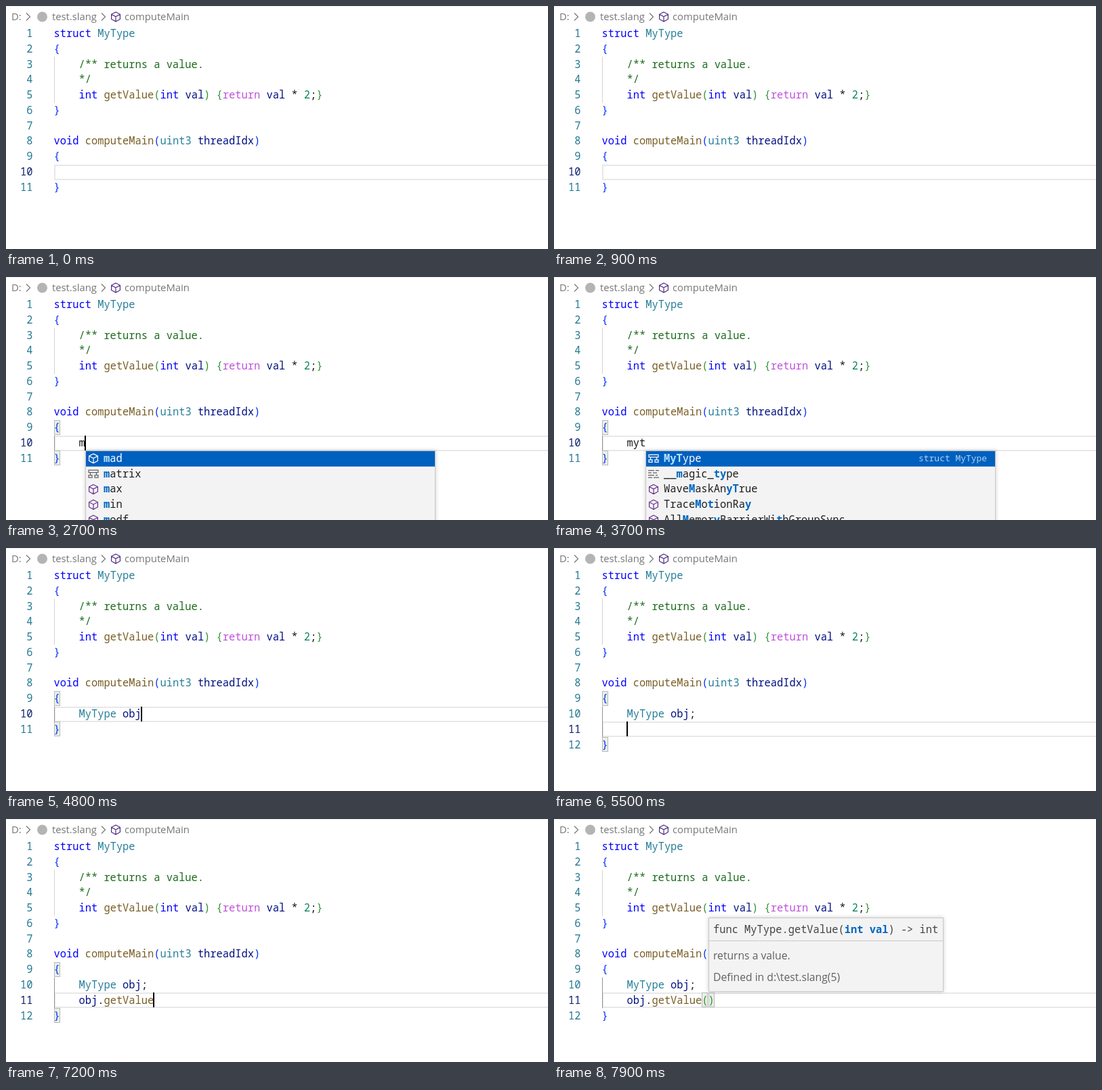
These frames come from a looping animation (800 px wide and 360 px high, 8 s). An HTML page with a canvas:

```html
<!DOCTYPE html>
<html lang="en">
<head>
<meta charset="utf-8">
<title>Code completion</title>
<style>
html, body { margin: 0; width: 100%; height: 100%; overflow: hidden; background: #fff; }
canvas { display: block; }
</style>
</head>
<body>
<canvas id="stage" width="800" height="360"></canvas>
<script>
const ctx = document.getElementById('stage').getContext('2d');
const LOOP = 8000, CHAR = 9.23, ROW = 22.78, LEFT = 70.6, POPUP_WIDTH = 517;
const MONO = '"Noto Sans Mono", monospace', SANS = '"Open Sans", sans-serif';
const CODE = `15.38px ${MONO}`, BOLD = `bold ${CODE}`;

const color = {
  keyword: '#0000ff', type: '#267f99', func: '#795e26', variable: '#001080', comment: '#1c6b1c',
  control: '#c050dc', number: '#098658', outer: '#0431fa', inner: '#319331', plain: '#1a1a1a'
};

// Code lines are lists of [colour name, text].
const header = [
  [['keyword', 'struct '], ['type', 'MyType']],
  [['outer', '{']],
  [['comment', '    /** returns a value.']],
  [['comment', '    */']],
  [['keyword', '    int '], ['func', 'getValue'], ['inner', '('], ['keyword', 'int '], ['variable', 'val'],
   ['inner', ') {'], ['control', 'return '], ['variable', 'val'], ['plain', ' * '], ['number', '2'],
   ['plain', ';'], ['inner', '}']],
  [['outer', '}']],
  [],
  [['keyword', 'void '], ['func', 'computeMain'], ['outer', '('], ['type', 'uint3 '],
   ['variable', 'threadIdx'], ['outer', ')']],
  [['outer', '{']]
];
const plain = text => [['plain', text]];
const declare = (name, end = '') => [['type', 'MyType'], ['variable', ' ' + name], ['plain', end]];
const declared = declare('obj', ';');
const object = [['variable', 'obj'], ['plain', '.']];
const method = [...object, ['func', 'getValue']];

// Popup rows: icon letter, then the label with matched letters between tildes.
const lists = {
  m: ['f~m~ad', 's~m~atrix', 'f~m~ax', 'f~m~in', 'f~m~odf'],
  my: ['s~My~Type', 'k__~m~agic_t~y~pe', 'fWave~M~askAn~y~True', 'fTrace~M~otionRa~y~', 'fAll~M~emor~y~BarrierWithGroupSync'],
  myt: ['s~MyT~ype', 'k__~m~agic_~ty~pe', 'fWave~M~askAn~yT~rue', 'fTrace~M~o~t~ionRa~y~', 'fAll~M~emor~y~BarrierWi~t~hGroupSync'],
  o: ['v~o~bj', 'k~o~ut', 'f~O~bjectRayDirection', 'f~O~bjectRayOrigin'],
  ob: ['v~ob~j', 'f~Ob~jectRayDirection', 'f~Ob~jectRayOrigin', 'f~Ob~jectToWorld'],
  obj: ['v~obj~', 'f~Obj~ectRayDirection', 'f~Obj~ectRayOrigin', 'f~Obj~ectToWorld'],
  member: ['fgetValue']
};
const details = {
  my: 'struct MyType', myt: 'struct MyType', o: 'MyType obj', ob: 'MyType obj', obj: 'MyType obj',
  member: 'func MyType.getValue(int val) -> int'
};

// Each step: start time, typed lines, open popup.
const steps = [
  [0, [[]]],
  [1200, [[]]],
  [2700, [plain('m')], 'm'],
  [3000, [plain('my')], 'my'],
  [3100, [plain('myt')], 'myt'],
  [4000, [[['type', 'MyType']]]],
  [4300, [declare('')]],
  [4500, [declare('o')]],
  [4600, [declare('ob')]],
  [4800, [declare('obj')]],
  [5100, [declared]],
  [5400, [declared, []]],
  [5900, [declared, plain('o')], 'o'],
  [6300, [declared, plain('ob')], 'ob'],
  [6500, [declared, [['variable', 'obj']]], 'obj'],
  [6700, [declared, object], 'member'],
  [7200, [declared, method]],
  [7400, [declared, [...method, ['inner', '(']]]]
];
const FOCUS = 1200, CALL = 7400, TOOLTIP = 7500;

const icons = {
  f: 'M8 1 14.4 4.3V11.5L8 15 1.6 11.5V4.3ZM1.6 4.3 8 7.7 14.4 4.3M8 7.7V15',
  s: 'M1 2.5H15V6H1ZM1 10H6V13.5H1ZM10 10H15V13.5H10ZM3.5 6V10M12.5 6V10',
  k: 'M0 3H9M11 3H16M0 6.5H5M7 6.5H13M0 10H9M11 10H14M0 13.5H6M8 13.5H16',
  v: 'M3.5 3H1V13H3.5M12.5 3H15V13H12.5M4.5 8A3.5 3 0 1 0 11.5 8A3.5 3 0 1 0 4.5 8M5 11 11 5'
};
const iconColor = { f: '#652d90', s: '#616161', k: '#616161', v: '#007acc' };

const lineCenter = line => 41 + ROW * (line - 1);
const lineTop = line => lineCenter(line) - ROW / 2;
const columnX = n => LEFT + CHAR * n;
const tokensLength = tokens => tokens.reduce((sum, [, text]) => sum + text.length, 0);

function fillBox(x, y, w, h, fill) {
  ctx.fillStyle = fill;
  ctx.fillRect(x, y, w, h);
}

function borderedBox(x, y, w, h, fill, stroke) {
  fillBox(x, y, w, h, fill);
  ctx.strokeStyle = stroke;
  ctx.lineWidth = 1;
  ctx.strokeRect(x + .5, y + .5, w - 1, h - 1);
}

function panel(x, y, w, h) {
  ctx.save();
  ctx.shadowColor = 'rgba(0,0,0,.2)';
  ctx.shadowBlur = 6;
  fillBox(x, y, w, h, '#f3f3f3');
  ctx.restore();
  borderedBox(x, y, w, h, '#f3f3f3', '#c8c8c8');
}

function write(text, x, y, fill, font = CODE, align = 'left') {
  ctx.font = font;
  ctx.fillStyle = fill;
  ctx.textAlign = align;
  ctx.fillText(text, x, y + 5);
}

function writeTokens(tokens, x, y) {
  for (const [name, text] of tokens) {
    write(text, x, y, color[name]);
    x += text.length * CHAR;
  }
}

function icon(kind, x, y, stroke) {
  ctx.save();
  ctx.translate(x, y - 8);
  ctx.strokeStyle = stroke;
  ctx.lineWidth = 1.2;
  ctx.stroke(new Path2D(icons[kind]));
  ctx.restore();
}

function chevron(x) {
  ctx.strokeStyle = '#767676';
  ctx.lineWidth = 1.2;
  ctx.stroke(new Path2D(`M${x} 10.5l5.5 5.5l-5.5 5.5`));
}

function breadcrumb() {
  const font = `14.8px ${SANS}`;
  fillBox(0, 0, 800, 1, '#eceef3');
  write('D:', 8, 16, '#767676', font);
  chevron(30);
  ctx.fillStyle = '#b4b4b4';
  ctx.beginPath();
  ctx.arc(53.5, 16, 7.5, 0, 7);
  ctx.fill();
  write('test.slang', 68, 16, '#767676', font);
  chevron(141);
  icon('f', 154, 16, '#4b2a80');
  write('computeMain', 175, 16, '#767676', font);
}

function bracketBox(line, col) {
  borderedBox(Math.round(columnX(col)), Math.round(lineTop(line)), 9, 22, '#e8f0e8', '#b9b9b9');
}

function popup(list, x, y) {
  const rows = lists[list];
  panel(x, y, POPUP_WIDTH, rows.length * ROW + 2);
  rows.forEach((row, i) => {
    const mid = y + ROW * (i + .5) + .5, selected = i === 0;
    if (selected) fillBox(x + 1, y + 1, POPUP_WIDTH - 2, ROW, '#0060c0');
    icon(row[0], x + 4, mid, selected ? '#fff' : iconColor[row[0]]);
    let labelX = x + 27;
    row.slice(1).split('~').forEach((part, k) => {
      const matched = k % 2;
      const fill = selected ? (matched ? '#b5e3ff' : '#fff') : (matched ? '#0066bf' : '#1f1f1f');
      write(part, labelX, mid, fill, matched ? BOLD : CODE);
      labelX += part.length * CHAR;
    });
  });
  if (details[list]) {
    write(details[list], x + POPUP_WIDTH - 13, y + ROW / 2, '#b3d0ec', `12.95px ${MONO}`, 'right');
  }
  if (list === 'o') fillBox(x + POPUP_WIDTH - 13, y, 12, 53, '#c1c1c1');
}

function tooltip() {
  const font = `15.7px ${SANS}`, lead = 'func MyType.getValue(', active = 'int val';
  panel(228, 146, 347, 110);
  fillBox(229, 180, 345, 1, '#c8c8c8');
  write(lead, 235, 163.5, '#444');
  write(active, 235 + lead.length * CHAR, 163.5, '#0066bf', BOLD);
  write(') -> int', 235 + (lead + active).length * CHAR, 163.5, '#444');
  write('returns a value.', 235, 203, '#616161', font);
  write('Defined in d:\\test.slang(5)', 235, 235, '#616161', font);
}

function draw(t) {
  const [start, typed, list] = steps.filter(step => step[0] <= t).pop();
  const current = 9 + typed.length, last = current + 1;
  const cursorCol = 4 + tokensLength(typed[typed.length - 1]);
  const cursorX = Math.round(columnX(cursorCol));
  const boxTop = Math.round(lineTop(current));

  fillBox(0, 0, 800, 360, '#fff');
  breadcrumb();

  ctx.strokeStyle = '#e8e8e8';
  ctx.lineWidth = 2;
  ctx.strokeRect(72, boxTop + 1, 740, 21);
  fillBox(71, lineTop(3), 1, ROW * 3, '#d3d3d3');
  if (t >= FOCUS) fillBox(71, lineTop(10), 1, ROW * typed.length, '#939393');

  if (t >= CALL) {
    bracketBox(current, cursorCol - 1);
    bracketBox(current, cursorCol);
  } else if (t >= FOCUS) {
    bracketBox(9, 0);
    bracketBox(last, 0);
  }

  const body = typed.map(tokens => [['plain', '    '], ...tokens]);
  [...header, ...body, [['outer', '}']]].forEach((tokens, i) => {
    const line = i + 1, y = lineCenter(line);
    write(line, 39.5, y, line === current ? '#0b216f' : '#237893', CODE, 'right');
    writeTokens(tokens, LEFT, y);
  });
  if (t >= CALL) write(')', columnX(cursorCol), lineCenter(current), color.inner);

  const blinkOn = (t - start) % 1000 < 500;
  if (t >= FOCUS && blinkOn) fillBox(cursorX - 1, boxTop, 2, 22, '#000');
  if (list) popup(list, cursorX, Math.round(lineTop(last)));
  if (t >= TOOLTIP) tooltip();
}

function tick() {
  draw(performance.now() % LOOP);
  requestAnimationFrame(tick);
}
tick();
</script>
</body>
</html>
```
